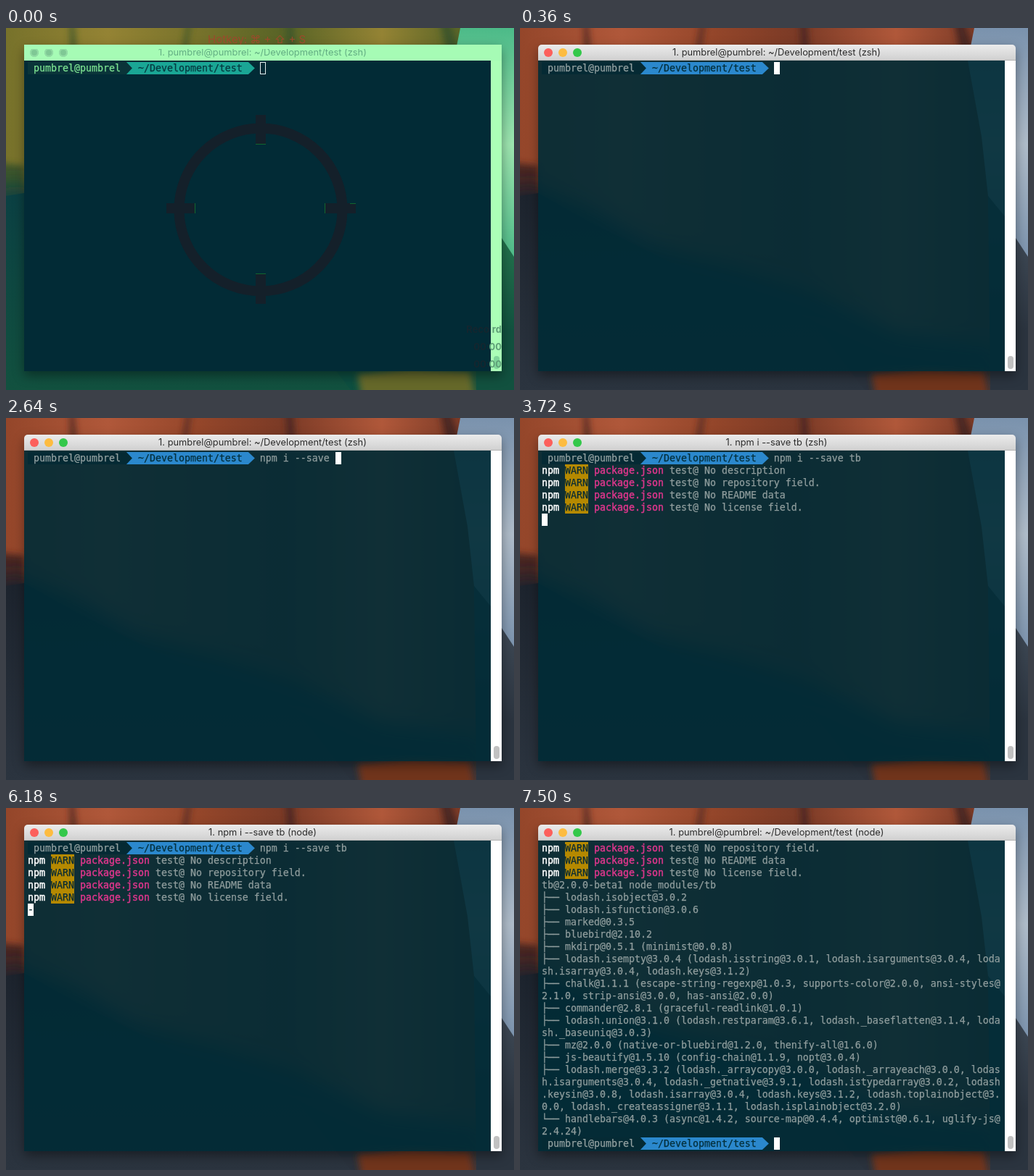
Write an HTML page that moves like this. It is 700 px wide and 500 px high and loops after 8000 ms.

```html
<!DOCTYPE html>
<html lang="en">
<head>
<meta charset="utf-8">
<title>Terminal install</title>
<style>
html, body { margin: 0; width: 100%; height: 100%; overflow: hidden; }
#stage {
  --rock1: #94462a; --rock2: #b0583a; --rock3: #7a3a26; --crack: #4a2520;
  --slate1: #2b343f; --slate2: #1c232d; --ridge: #47525f;
  --sky1: #7a92ad; --sky2: #b0bdca; --glow: #71351f;
  --bar: linear-gradient(#ebebeb, #d1d1d1); --edge: #b4b4b4; --label: #2c2c2c;
  --paper: #fff; --thumb: #c1c1c1; --term: rgba(0, 43, 54, .91);
  --user: #93a1a1; --userbg: #052a34; --path: #2b88cd; --pathfg: #04303d;
  position: relative; width: 700px; height: 500px; overflow: hidden; background: #27303b;
}
#stage.idle { --bar: #f6f6f6; --edge: #dcdcdc; --label: #a6a6a6; }
#stage.tint {
  --rock1: #77722b; --rock2: #948334; --rock3: #576326; --crack: #3c5529;
  --slate1: #12513f; --slate2: #0b4043; --ridge: #2b8353;
  --sky1: #4cba88; --sky2: #9ee6b0; --glow: #66692b;
  --bar: #a6fbb5; --edge: #a6fbb5; --label: #63ad83;
  --paper: #abffb7; --thumb: #7fd69a; --term: #022b36;
  --user: #7de392; --userbg: #0a3439; --path: #1aa695; --pathfg: #063a40;
}
svg { position: absolute; left: 0; top: 0; }
#win { position: absolute; left: 25px; top: 23px; width: 658px; height: 451px;
  border-radius: 5px 5px 0 0; box-shadow: 0 6px 16px rgba(0, 0, 0, .4); }
#bar { position: absolute; inset: 0 0 auto; height: 22px; box-sizing: border-box;
  border-radius: 5px 5px 0 0; background: var(--bar); border-bottom: 1px solid var(--edge); }
#bar i { position: absolute; top: 5px; width: 12px; height: 12px; border-radius: 50%; }
.idle #bar i { background: #d6d6d6 !important; }
.tint #bar i { background: #7fc895 !important; box-shadow: inset 0 0 0 2px #93dda5; }
#title { position: absolute; left: 0; right: 1px; top: 0; text-align: center; color: var(--label);
  font: 12.85px/22px Inter, Roboto, sans-serif; white-space: pre; }
#term { position: absolute; left: 0; top: 22px; width: 643px; bottom: 0; background: var(--term); }
#scroll { position: absolute; right: 0; top: 22px; width: 15px; bottom: 0; background: var(--paper); }
#scroll i { position: absolute; left: 4px; bottom: 3px; width: 8px; height: 18px;
  border-radius: 4px; background: var(--thumb); }
#rows { position: absolute; left: 30px; top: 47px; color: #8f9d9d;
  font: 13.29px/17px "DejaVu Sans Mono", monospace; -webkit-text-stroke: .25px; }
#rows div { height: 17px; white-space: pre; }
#rows span { display: inline-block; height: 17px; vertical-align: top; }
.user { color: var(--user); background: var(--userbg); }
.path { color: var(--pathfg); background: var(--path); }
.tip { width: 8px; background: var(--path); }
.tip::before { content: ""; display: block; height: 17px; background: var(--userbg);
  clip-path: polygon(0 0, 100% 50%, 0 100%); }
.tip.end { background: none; }
.tip.end::before { width: 9px; background: var(--path); }
.npm { color: #fff; -webkit-text-stroke: .5px; }
.warn { color: #0a2c34; background: #b58900; }
.pkg { color: #d9368a; -webkit-text-stroke: .5px; }
.cur { width: 8px; color: #06262f; background: #fff; }
.idle .cur { background: none; box-shadow: inset 0 0 0 1px #e4eeee; }
#ghost { display: none; }
.tint #ghost { display: block; }
#ghost text { font-family: Inter, "DejaVu Sans", sans-serif; }
</style>
</head>
<body>
<div id="stage">
  <svg width="700" height="500">
    <defs>
      <linearGradient id="rock">
        <stop offset="0" style="stop-color:var(--rock1)"/>
        <stop offset=".2" style="stop-color:var(--rock2)"/>
        <stop offset=".38" style="stop-color:var(--rock1)"/>
        <stop offset=".55" style="stop-color:var(--rock3)"/>
        <stop offset=".74" style="stop-color:var(--rock2)"/>
        <stop offset=".9" style="stop-color:var(--rock3)"/>
      </linearGradient>
      <linearGradient id="sky" x2="0" y2="1">
        <stop offset="0" style="stop-color:var(--sky1)"/>
        <stop offset=".5" style="stop-color:var(--sky2)"/>
        <stop offset="1" style="stop-color:var(--sky1)"/>
      </linearGradient>
      <linearGradient id="slate" x2="0" y2="1">
        <stop offset="0" style="stop-color:var(--slate2)"/>
        <stop offset="1" style="stop-color:var(--slate1)"/>
      </linearGradient>
      <linearGradient id="ridge" x2="0" y2="1">
        <stop offset="0" style="stop-color:var(--ridge)"/>
        <stop offset=".7" style="stop-color:var(--slate1)"/>
      </linearGradient>
      <filter id="soft"><feGaussianBlur stdDeviation="5"/></filter>
      <filter id="haze"><feGaussianBlur stdDeviation="14"/></filter>
    </defs>
    <rect width="700" height="500" fill="url(#rock)"/>
    <g filter="url(#soft)">
      <path d="M386-9h9l3 40h-10zM250-9h5l-6 40h-6zM88-9h5l4 40h-8zM598-9h14l14 40h-20z" style="fill:var(--crack)"/>
      <path d="M-20 185 25 190V240H-20Z" style="fill:var(--crack)"/>
    </g>
    <path d="M-40 226 20 218 100 250 180 298 300 330 400 364 520 420 660 440V540H-40Z"
      fill="url(#slate)" filter="url(#haze)"/>
    <path d="M0 232 25 228 100 270 200 320 300 365 400 402 475 500H0Z" fill="url(#slate)"/>
    <path d="M484 478 560 470 640 474 646 510H490Z" style="fill:var(--glow)" filter="url(#soft)"/>
    <path d="M626 0H700V322L668 265 645 232 636 150 617 45Z" fill="url(#sky)"/>
    <path d="M645 232 668 260 683 290 700 316V500H648Z" fill="url(#ridge)"/>
  </svg>
  <div id="win">
    <div id="bar">
      <i style="left:8px;background:#fc605c"></i>
      <i style="left:28px;background:#fdbc40"></i>
      <i style="left:48px;background:#34c84a"></i>
      <div id="title"></div>
    </div>
    <div id="term"></div>
    <div id="scroll"><i></i></div>
  </div>
  <svg id="ghost" width="700" height="500">
    <circle cx="351" cy="251" r="112.5" fill="none" stroke="#14202a" stroke-width="14"/>
    <path d="M344 120h14v41h-14zM344 339h14v42h-14zM221 242h40v14h-40zM440 242h42v14h-42z" fill="#14202a"/>
    <path d="M344 160.5h14M344 339.5h14M260.5 242v14M439.5 242v14M474 242.5h8" stroke="#11662f"/>
    <text x="278" y="21" font-size="15" fill="#9c4a2c">Hotkey: ⌘ + ⇧ + S</text>
    <rect x="25" y="23" width="658" height="6" fill="#a6fbb5"/>
    <g font-size="13" font-weight="700" text-anchor="end" fill="#5f9f78">
      <text x="683" y="421">rd</text><text x="683" y="445">00</text><text x="683" y="469">00</text>
    </g>
    <g font-size="13" font-weight="700" text-anchor="end" fill="#14262f">
      <text x="666" y="421">Reco</text><text x="666" y="445">00:</text><text x="666" y="469">00:</text>
    </g>
  </svg>
  <div id="rows"></div>
</div>
<script>
const LOOP = 8000;
const HOST = "pumbrel@pumbrel", DIR = "~/Development/test", CMD = "npm i --save tb";
const KEYS = [1200, 1320, 1440, 1560, 1680, 1800, 1920, 2040, 2160, 2280, 2340, 2520, 2640, 2940, 3180];
// Spinner bursts: start time and number of 60 ms ticks.
const SPINS = [[3900, 3], [4500, 12], [5520, 20], [6960, 2]];
const TREE = `tb@2.0.0-beta1 node_modules/tb
├── lodash.isobject@3.0.2
├── lodash.isfunction@3.0.6
├── marked@0.3.5
├── bluebird@2.10.2
├── mkdirp@0.5.1 (minimist@0.0.8)
├── lodash.isempty@3.0.4 (lodash.isstring@3.0.1, lodash.isarguments@3.0.4, loda
sh.isarray@3.0.4, lodash.keys@3.1.2)
├── chalk@1.1.1 (escape-string-regexp@1.0.3, supports-color@2.0.0, ansi-styles@
2.1.0, strip-ansi@3.0.0, has-ansi@2.0.0)
├── commander@2.8.1 (graceful-readlink@1.0.1)
├── lodash.union@3.1.0 (lodash.restparam@3.6.1, lodash._baseflatten@3.1.4, loda
sh._baseuniq@3.0.3)
├── mz@2.0.0 (native-or-bluebird@1.2.0, thenify-all@1.6.0)
├── js-beautify@1.5.10 (config-chain@1.1.9, nopt@3.0.4)
├── lodash.merge@3.3.2 (lodash._arraycopy@3.0.0, lodash._arrayeach@3.0.0, lodas
h.isarguments@3.0.4, lodash._getnative@3.9.1, lodash.istypedarray@3.0.2, lodash
.keysin@3.0.8, lodash.isarray@3.0.4, lodash.keys@3.1.2, lodash.toplainobject@3.
0.0, lodash._createassigner@3.1.1, lodash.isplainobject@3.2.0)
└── handlebars@4.0.3 (async@1.4.2, source-map@0.4.4, optimist@0.6.1, uglify-js@
2.4.24)`.split("\n");

const $ = id => document.getElementById(id);
const span = (cls, text = "") => `<span class="${cls}">${text}</span>`;
const cursor = (ch = " ") => span("cur", ch);
const prompt = span("user", ` ${HOST} `) + span("tip") + span("path", ` ${DIR} `) + span("tip end") + " ";
const warns = ["No description", "No repository field.", "No README data", "No license field."]
  .map(text => `${span("npm", "npm")} ${span("warn", "WARN")} ${span("pkg", "package.json")} test@ ${text}`);

function spinner(t) {
  let n = 0;
  for (const [start, ticks] of SPINS)
    if (t >= start) n += Math.min(ticks, Math.floor((t - start) / 60) + 1);
  return n ? "\\|/-"[n % 4] : " ";
}

function lines(t) {
  if (t >= 7440) return [...warns.slice(1), ...TREE, (t >= 7500 ? prompt : "") + cursor()];
  const typed = prompt + CMD.slice(0, KEYS.filter(k => k <= t).length);
  if (t < 3240) return [typed + cursor()];
  if (t < 3720) return [typed, cursor()];
  return [typed, ...warns, cursor(spinner(t))];
}

function title(t) {
  const running = t >= 3300 && t < 7500;
  return `1. ${running ? CMD : `${HOST}: ${DIR}`} (${t < 5940 ? "zsh" : "node"})`;
}

let shown = "";
function draw(now) {
  const t = now % LOOP;
  const look = t < 60 ? "idle tint" : t < 360 ? "idle" : "";
  const html = lines(t).map(l => `<div>${l}</div>`).join("");
  const name = title(t);
  if (look + name + html !== shown) {
    shown = look + name + html;
    $("stage").className = look;
    $("title").textContent = name;
    $("rows").innerHTML = html;
  }
}

const begin = performance.now();
function tick() {
  draw(performance.now() - begin);
  requestAnimationFrame(tick);
}
tick();
</script>
</body>
</html>
```
